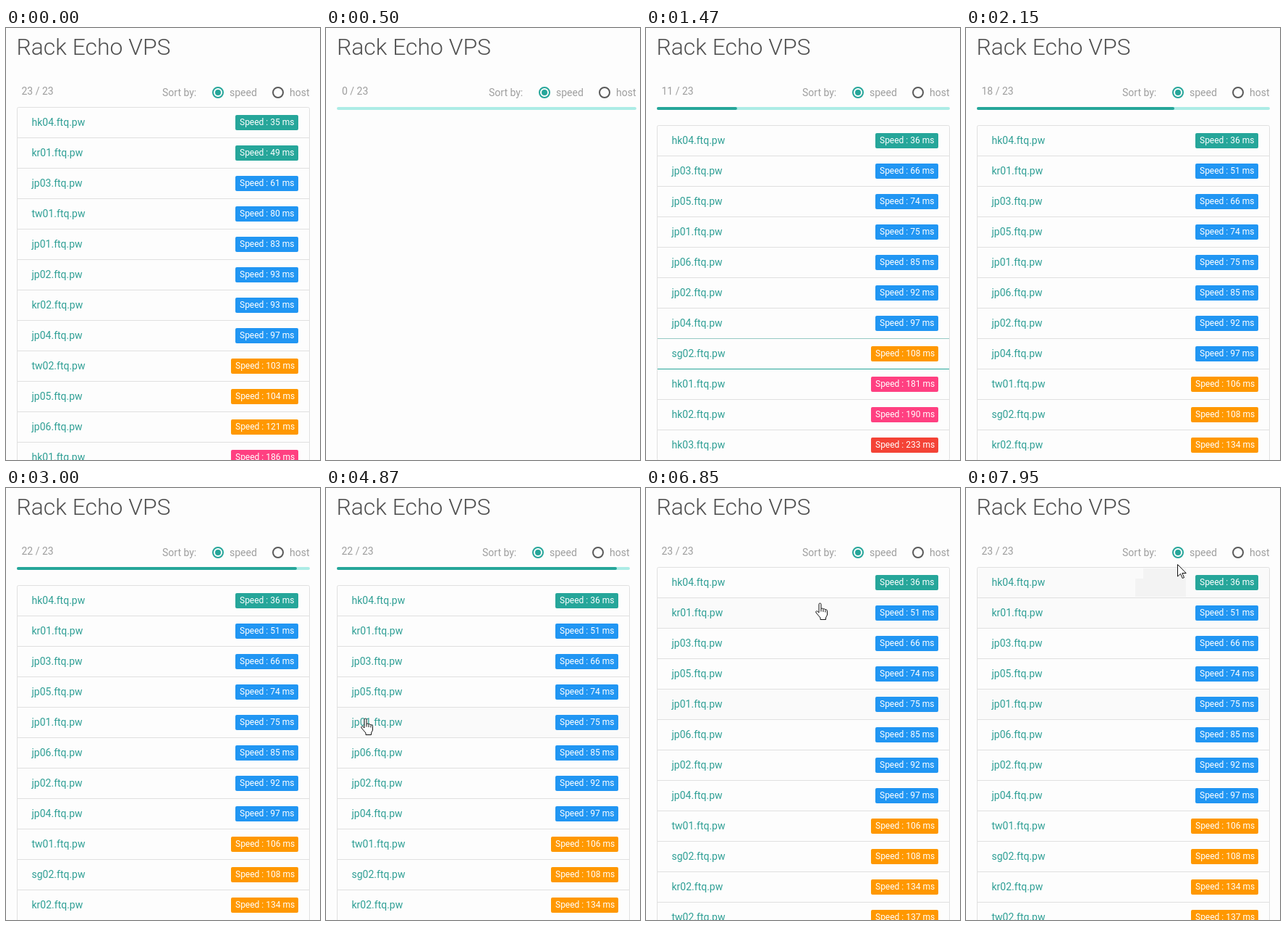
These frames come from a looping animation (434x596 px, 8000 ms). An HTML page:

```html
<!DOCTYPE html>
<html lang="en">
<head>
<meta charset="utf-8">
<title>Ping list</title>
<style>
html, body { margin: 0; width: 434px; height: 596px; overflow: hidden; background: #fdfdfd; }
svg { display: block; font-family: Roboto, sans-serif; font-size: 14px; }
.title { font-size: 31.92px; font-weight: 300; fill: #505050; }
.muted { fill: #9e9e9e; }
.host { fill: #2f9f95; }
.badge { font-size: 12px; fill: #fff; }
</style>
</head>
<body>
<svg id="stage" width="434" height="596" viewBox="0 0 434 596"></svg>
<script>
const LOOP = 8000, STEP = 136, PHASE = 1470;
const RESTART = 500, TOTAL = 23, ROW = 42, HEIGHT = 596;
const TEAL = [38, 166, 154], LINE = [224, 224, 224];
const stage = document.getElementById('stage');

const parse = (list, at) => list.split(', ').map(s => {
  const [host, ms] = s.split(' ');
  return { host, ms: +ms, at };
});

const before = parse('hk04 35, kr01 49, jp03 61, tw01 80, jp01 83, jp02 93, kr02 93, jp04 97, '
  + 'tw02 103, jp05 104, jp06 121, hk01 186', 0);

// replies of the new run, by time of arrival
const waves = {
  970: 'jp03 66',
  985: 'jp05 74, jp01 75',
  1025: 'jp06 85, jp02 92, jp04 97',
  1320: 'sg02 108',
  1470: 'hk04 36, hk01 181, hk02 190, hk03 233',
  1600: 'us01 241',
  1750: 'kr02 134',
  1870: 'tw01 106',
  2000: 'kr01 51, tw02 137',
  2150: 'us02 245, us03 252',
  2300: 'us04 258',
  2420: 'us05 264',
  2570: 'us06 270, us07 281',
  5550: 'us08 305'
};
const replies = Object.entries(waves).flatMap(([at, list]) => parse(list, +at))
  .sort((a, b) => a.ms - b.ms);

// a row that was last fades its separator in once a slower one arrives
replies.forEach((r, i) => {
  r.freed = Math.min(...replies.slice(i + 1).map(s => s.at));
});

// pointer moves: start, end, x, y
const START = [48, 317];
const moves = [
  [4870, 5142, 146, 315],
  [5142, 5686, 205, 280],
  [5910, 6300, 234, 158],
  [6850, 7240, 235, 134],
  [7650, 7860, 292.5, 105.5]
];

const clamp = v => Math.max(0, Math.min(1, v));
const mix = (a, b, k) => a + (b - a) * k;
const snap = t => PHASE + Math.floor((t - PHASE) / STEP) * STEP;
const rect = (x, y, w, h, fill, r = 0) =>
  `<rect x="${x}" y="${y}" width="${w}" height="${h}" rx="${r}" fill="${fill}"/>`;
const text = (x, y, s, cls) => `<text x="${x}" y="${y}" class="${cls}">${s}</text>`;
const ring = (x, color) =>
  `<circle cx="${x}" cy="89" r="7" fill="none" stroke="${color}" stroke-width="2"/>`;

function speedColor(ms) {
  return ms < 50 ? '#26a69a' : ms < 100 ? '#2196f3' : ms < 150 ? '#ff9800'
    : ms < 200 ? '#ff4081' : '#f44336';
}

function lineColor(item, t) {
  const k = item.freed > item.at ? clamp((t - item.freed) / 250) : 1;
  return `rgb(${TEAL.map((c, i) => Math.round(mix(c, LINE[i], k)))})`;
}

function header(count, right, left) {
  const dx = right - 420;
  return text(14.5 + left, 37, 'Rack Echo VPS', 'title')
    + text(21.5 + left, 92, `${count} / ${TOTAL}`, 'muted')
    + text(216 + dx, 94, 'Sort by:', 'muted')
    + ring(293 + dx, '#26a69a') + `<circle cx="${293 + dx}" cy="89" r="4" fill="#26a69a"/>`
    + text(309 + dx, 94, 'speed', 'muted')
    + ring(376 + dx, '#5a5a5a') + text(392 + dx, 94, 'host', 'muted');
}

// the fill starts as a sliver, grows evenly and slows near its end
function progress(t, right) {
  const fast = clamp((t - 1030) / 1120), slow = clamp((t - 2150) / 690);
  const fill = t < 1025 ? 0 : 6 + 267 * fast + 114 * slow;
  return rect(15, 109, right - 15, 4, '#acece6', 2) + rect(15, 109, fill, 4, '#26a69a', 2);
}

function rows(items, count, t, top, right, left) {
  const lines = items.map((item, i) => {
    const y = top + 1 + i * ROW;
    const w = item.ms < 100 ? 87 : 93, x = right - 16 - w;
    return text(35.5 + left, y + 25, item.host + '.ftq.pw', 'host')
      + rect(x, y + 10, w, 21, speedColor(item.ms), 2)
      + text(x + 6, y + 24, `Speed : ${item.ms} ms`, 'badge')
      + (i < count - 1 ? rect(16, y + 41, right - 17, 1, lineColor(item, t)) : '');
  });
  return lines.join('') + `<rect x="15.5" y="${top + 0.5}" width="${right - 16}"
    height="${count * ROW}" rx="2" fill="none" stroke="rgb(${LINE})"/>`;
}

function pointerAt(t) {
  let [x, y] = START;
  for (const [from, to, nx, ny] of moves) {
    const k = clamp((t - from) / (to - from));
    x = mix(x, nx, k);
    y = mix(y, ny, k);
  }
  return [x, y];
}

// rows the pointer has crossed keep a faint tint
function tints(t, top) {
  const tint = row => rect(16, top + 1 + row * ROW, 403, 41, '#fafafa');
  let s = '';
  if (t >= 4870 && t < 5550 || t >= 5910) s += tint(4);
  if (t >= 6300) s += tint(1);
  if (t >= 6970) s += tint(0);
  if (t >= 7860) s += rect(245, 111, 59, 14, '#f3f3f3') + rect(234, 125, 70, 25, '#f3f3f3');
  return s;
}

function cursor([x, y]) {
  const shape = y < 109
    ? '<path d="M0 0V16.5L4 12.8 6.7 19 9 18 6.3 12H11.7Z"/>'
    : `<path d="M5 14V2.5a1.5 1.5 0 0 1 3 0V8.5l1.5-.5 1.5 1 1.5-.3 1.5 1.2 1.5-.1 1 1.5V17
        l-2 4v2.5H7V21L1 14q-.8-1.6.6-2.2 1.2-.2 2.2 1z"/>
      <path d="M8 8.5v4M11 9.5v3.5M14 10.5v3" fill="none"/>`;
  return `<g transform="translate(${x} ${y})" fill="#fff" stroke="#111"
    stroke-linejoin="round">${shape}</g>`;
}

function draw(t) {
  const fresh = t >= RESTART;
  const items = fresh ? replies.filter(r => r.at <= t) : before;
  const count = fresh ? items.length : TOTAL;
  const loading = count < TOTAL;
  const top = loading ? 134 : 109;
  const fits = top + count * ROW < HEIGHT;   // no scroll bar needed
  const right = fits ? 429 : 420, left = fits ? 0.5 : 0;
  const tick = snap(t);
  stage.innerHTML = header(count, right, left)
    + (loading ? progress(tick < 1030 ? t : tick, right) : '')
    + tints(t, top)
    + (count ? rows(items, count, t, top, right, left) : '')
    + (t >= moves[0][0] ? cursor(pointerAt(tick)) : '');
}

function frame() {
  draw(performance.now() % LOOP);
  requestAnimationFrame(frame);
}
frame();
</script>
</body>
</html>
```
